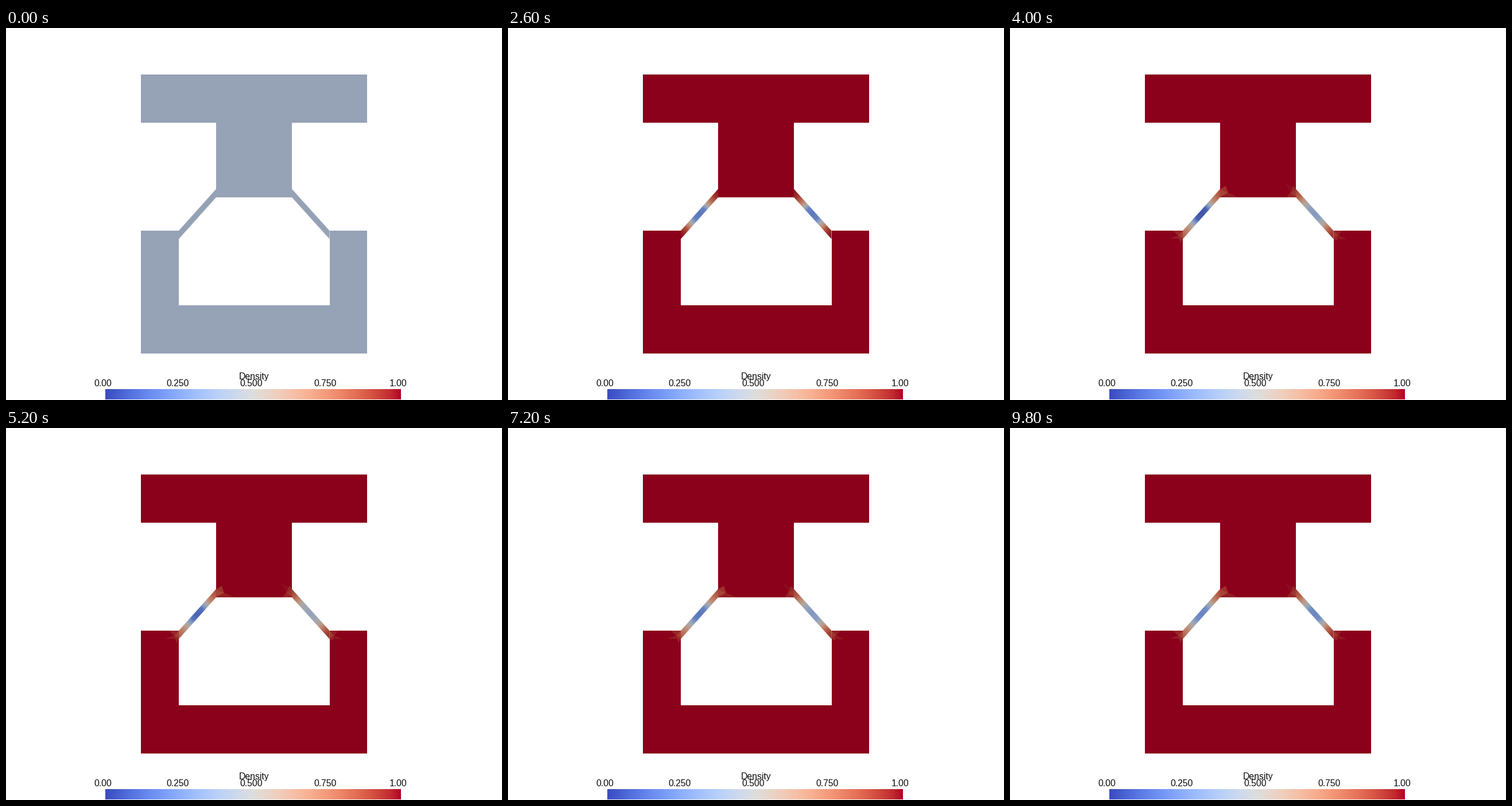
A matplotlib script for the animation above (10000 ms loop, 864 by 648 pixels).

```python
import matplotlib.pyplot as plt
import numpy as np
from matplotlib.animation import FuncAnimation
from matplotlib.colors import to_rgb
from matplotlib.patches import Polygon

W, H, DPI = 864, 648, 100
STEP, FRAMES = 200, 50
START = 2600
SHADE = 0.765
GREY, RED = np.array(to_rgb("#96a2b5")), np.array(to_rgb("#8b001a"))
coolwarm = plt.get_cmap("coolwarm")

fig = plt.figure(figsize=(W / DPI, H / DPI), dpi=DPI, facecolor="white")
ax = fig.add_axes([0, 0, 1, 1])

# Solid blocks above and below the hinges
blocks = [
    [(235, 81), (629, 81), (629, 165), (498, 165), (498, 295),
     (366, 295), (366, 165), (235, 165)],
    [(235, 353), (301, 353), (301, 483), (563.5, 483), (563.5, 353),
     (629, 353), (629, 567), (235, 567)],
]
bodies = [ax.add_patch(Polygon(b, lw=0)) for b in blocks]

# Mesh cells next to the hinges: density, corners
cells = [
    (0.93, [(366, 281), (376, 275), (380, 287)]),
    (0.89, [(366, 281), (380, 287), (366, 295)]),
    (0.965, [(366, 295), (380, 287), (398, 295)]),
    (0.985, [(478, 269), (498, 281), (486, 282)]),
    (0.95, [(498, 281), (494, 275), (487, 287)]),
    (0.92, [(498, 281), (498, 295), (488, 287)]),
    (0.955, [(498, 295), (488, 287), (482, 295)]),
    (0.95, [(284, 353), (301, 353), (293, 362)]),
    (0.90, [(301, 353), (301, 367), (293, 362)]),
    (0.965, [(277, 367), (293, 362), (297, 367)]),
    (0.955, [(293, 362), (301, 367), (297, 375)]),
    (0.965, [(563.5, 353), (579, 353), (572, 361)]),
    (0.92, [(563.5, 353), (572, 361), (563.5, 367)]),
    (0.975, [(572, 361), (586, 368), (572, 368)]),
    (0.955, [(563.5, 367), (572, 361), (570, 370)]),
]


def shaded(density):
    return np.asarray(coolwarm(density))[..., :3] * SHADE


patches = [(ax.add_patch(Polygon(p, lw=0)), shaded(d)) for d, p in cells]

# Density along a hinge, from its lower to its upper end
KNOTS = [-0.06, 0.05, 0.15, 0.25, 0.38, 0.5, 0.62, 0.72, 0.82, 0.92, 1.06]
FIRST = np.array([1, .96, .85, .6, 0, 0, 0, .6, .8, .93, 1])
LATER = {
    "left": np.array([.85, .76, .65, .5, 0, 0, 0, .48, .68, .8, .9]),
    "right": np.array([.95, .9, .78, .58, 0, 0, 0, .5, .66, .82, .92]),
}
TIMES = [2600, 3000, 4000, 5200, 7200, 9800]
CORE = {
    "left": [.19, .12, .08, .13, .19, .24],
    "right": [.20, .30, .35, .41, .34, .25],
}


class Hinge:
    def __init__(self, side, lower, upper, half=7.25):
        self.side = side
        (xa, ya), (xb, yb) = lower, upper
        x0, x1 = min(xa, xb), max(xa, xb)
        y0, y1 = yb - half, ya + half
        nx, ny = int((x1 - x0) * 4), int((y1 - y0) * 4)
        x = x0 + (np.arange(nx) + 0.5) * (x1 - x0) / nx
        y = y0 + (np.arange(ny) + 0.5) * (y1 - y0) / ny
        gx, gy = np.meshgrid(x, y)
        dx, dy = xb - xa, yb - ya
        self.along = ((gx - xa) * dx + (gy - ya) * dy) / (dx * dx + dy * dy)
        self.image = ax.imshow(np.zeros((ny, nx, 3)), aspect="auto",
                               extent=(x0, x1, y1, y0), zorder=2)
        outline = Polygon([(xa, ya - half), (xb, yb - half),
                           (xb, yb + half), (xa, ya + half)],
                          transform=ax.transData)
        self.image.set_clip_path(outline)

    def update(self, t, mix):
        if t < START:
            self.image.set_data(np.tile(GREY, self.along.shape + (1,)))
            return
        core = np.interp(t, TIMES, CORE[self.side])
        values = FIRST + (LATER[self.side] - FIRST) * mix
        values[4:7] = core + 0.04, core, core + 0.04
        self.image.set_data(shaded(np.interp(self.along, KNOTS, values)))


hinges = [Hinge("left", (301, 360.25), (366, 287.75)),
          Hinge("right", (563.5, 360.25), (498, 287.75))]

# Colour bar
bar = np.asarray(coolwarm(np.linspace(0, 1, 256)))[None, :, :3]
ax.imshow(bar, aspect="auto", extent=(173, 687.5, 647, 629),
          interpolation="nearest")


def label(x, y, text):
    ax.text(x, y, text, ha="center", va="baseline", color="#0a0a0a",
            family="Liberation Sans", fontsize=15.7 * 72 / DPI)


label(432, 612, "Density")
for x, text in [(169, "0.00"), (299, "0.250"), (427, "0.500"),
                (556, "0.750"), (683.5, "1.00")]:
    label(x, 624.3, text)

ax.set_xlim(0, W)
ax.set_ylim(H, 0)
ax.axis("off")


def draw(i):
    t = i * STEP
    solved = t >= START
    mix = np.interp(t, [2600, 3000, 4000], [0, 0.7, 1])
    for body in bodies:
        body.set_facecolor(RED if solved else GREY)
    for patch, color in patches:
        patch.set_visible(t > START)
        patch.set_facecolor(RED + (color - RED) * mix)
    for hinge in hinges:
        hinge.update(t, mix)
    return bodies + [p for p, _ in patches] + [h.image for h in hinges]


anim = FuncAnimation(fig, draw, frames=FRAMES, interval=STEP,
                     repeat=True, repeat_delay=0, blit=False)
plt.show()
```
